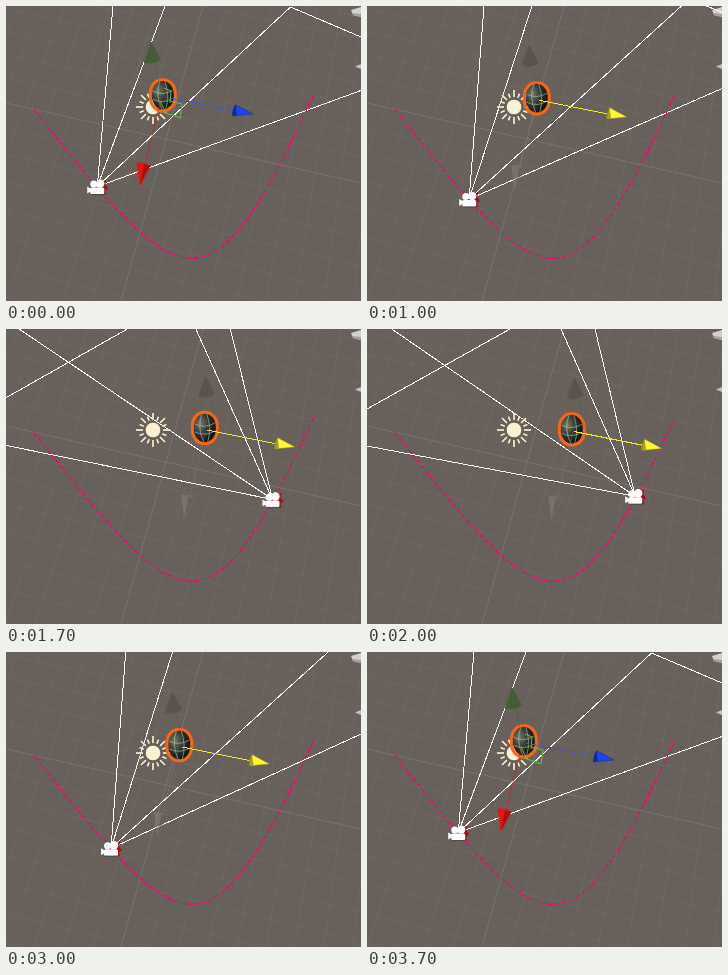
These frames come from a looping animation (355x295 px, 4.2 s). An HTML page:

```html
<!DOCTYPE html>
<html lang="en">
<head>
<meta charset="utf-8">
<title>Camera on a curve</title>
<style>
  html, body { margin: 0; width: 100%; height: 100%; overflow: hidden; background: #67605b; }
  svg { display: block; width: 100vw; height: 100vh; }
  .crisp { shape-rendering: crispEdges; }
</style>
</head>
<body>
<svg id="stage" viewBox="0 0 355 295" fill="none">
  <defs>
    <radialGradient id="ball" cx=".3" cy=".35" r=".8">
      <stop offset="0" stop-color="#77796a"/>
      <stop offset=".5" stop-color="#2b332d"/>
      <stop offset="1" stop-color="#080c0a"/>
    </radialGradient>
  </defs>
  <rect width="355" height="295" fill="#67605b"/>
  <g id="grid"></g>
  <path d="M345 4L355 1V11L347 9Z" fill="#d2d1cf"/>
  <path d="M346 7L355 8V11L347 9Z" fill="#a3a09d"/>
  <path d="M349 60.500L355 58V63Z" fill="#c4c2c0"/>
  <path id="frustum" class="crisp" stroke="#fff" stroke-width="1"/>
  <path class="crisp" d="M28 103.500C178 293 203 316 308.500 87" stroke="#fa0070" stroke-width="1.200" stroke-dasharray="5 2"/>
  <g id="sun" transform="translate(147 101)"></g>
  <g id="camera">
    <path d="M4 -5L9 -8L8 -3L11 1L8 3L9 7L5 6Z" fill="#a30f1c"/>
    <path d="M-10 -1L-5 2V3L-10 6Z" fill="#fff"/>
    <rect x="-7" y="0" width="14" height="6.500" rx="1.500" fill="#fff"/>
    <circle cx="-3.500" cy="-3.500" r="3.500" fill="#fff"/>
    <circle cx="3" cy="-4" r="4.200" fill="#fff"/>
    <path d="M-6 7H7" stroke="#464240" stroke-width=".8"/>
  </g>
  <g id="object">
    <ellipse rx="11" ry="14.500" fill="url(#ball)"/>
    <path d="M-10 -4Q0 1 10 -5M-10 4Q0 9 10 3M-3 -14Q-8 0 -1 14M2 -14Q7 0 3 14" stroke="#c3d3b6" stroke-width=".8" opacity=".7"/>
    <rect x="-12.500" y="-15.700" width="25" height="31.400" rx="12" ry="13.500" stroke="#ff6410" stroke-width="2.900"/>
  </g>
  <g id="up">
    <path d="M149 57L155 86" stroke-width="1" opacity=".4"/>
    <path d="M145 36L154 53Q148 59 138 56Z"/>
  </g>
  <g id="down">
    <path d="M155 93L139 159" stroke-width="1" opacity=".6"/>
    <path d="M134 179L131 157Q138 156 144 160Z"/>
    <path d="M134 179L138 158L144 160Z" fill="#000" stroke="none" opacity=".25"/>
  </g>
  <path id="planes" d="M154 95L160 107L174 112L176 98L164 95M158 82L165 85L164 97" stroke="#62c935" stroke-width="1"/>
  <g id="arrow">
    <path id="shaft" class="crisp" d="M159 91L229 105" stroke-width="1"/>
    <path id="tip" d="M247 108L229.500 98.500Q226 104 226.500 110Z" stroke-width=".5"/>
    <path d="M229.500 98.500Q226 104 226.500 110L231 109Z" fill="#000" opacity=".35"/>
  </g>
</svg>
<script>
const $ = id => document.getElementById(id);
const LOOP = 4200, STEP = 100;

// Drag distance per step, out and back
const out = [3, 6, 9, 13, 20, 24, 28, 32, 35.5, 39, 42, 45, 47, 48];
const back = [45, 39.5, 34, 31, 27, 24, 16.5, 11, 7, 3.3, 1.5, 0];

function drag(ms) {
  const n = Math.floor(ms / STEP);
  if (n < 7) return 0;
  if (n < 24) return out[Math.min(n - 7, out.length - 1)];
  return back[Math.min(n - 24, back.length - 1)];
}

function bezier(t) {
  const u = 1 - t;
  const mix = (a, b, c, d) => u * u * u * a + 3 * u * u * t * b + 3 * u * t * t * c + t * t * t * d;
  return [mix(28, 178, 203, 308), mix(104, 293, 316, 87)];
}

const move = (id, x, y) => $(id).setAttribute('transform', `translate(${x} ${y})`);
const paint = (id, attrs) => {
  for (const key in attrs) $(id).setAttribute(key, attrs[key]);
};

function drawGrid() {
  const line = (x1, y1, x2, y2, major) =>
    `<path d="M${x1} ${y1}L${x2} ${y2}" stroke="${major ? '#7f7b78' : '#77726e'}" stroke-width="${major ? 1 : .7}" opacity="${major ? .7 : .6}"/>`;
  let html = '';
  for (let i = -9; i <= 11; i++) html += line(197 + i * 23, 0, 115 + i * 29, 295, i === 0);
  for (let i = -7; i <= 8; i++) {
    const y = 97 + i * 25 + i * i * .4;
    html += line(0, y, 355, y + 80 + i * 1.5, i === 0);
  }
  $('grid').innerHTML = html;
}

function drawSun() {
  let rays = '';
  for (let i = 0; i < 16; i++) {
    const far = i % 2 ? 14.5 : 17;
    rays += `<path d="M0 -10V${-far}" transform="rotate(${i * 22.5})"/>`;
  }
  $('sun').innerHTML =
    `<g stroke="#4d4743" stroke-width="2.600" opacity=".4">${rays}</g>` +
    `<g stroke="#fbf0d2" stroke-width="1.700">${rays}</g>` +
    '<circle r="7.800" fill="#fbf0d2" stroke="#514b46" stroke-width=".7"/>';
}

function frustum(d, [x, y]) {
  const rays = ends => ends.map(([a, b]) => `M${x} ${y}L${a} ${b}`).join('');
  if (d < 18) {
    const corner = [284.5 + 2.9 * d, 1 - .62 * d];
    return rays([[107 + .77 * d, 0], [159 + .46 * d, 0], corner, [355, 84.5 - .15 * d]]) +
      `M${corner}L355 ${31 - 1.9 * d}`;
  }
  const e = (d - 32) / 16;
  return rays([[183 + 11 * e, 0], [218 + 10 * e, 0], [0, 5 - 22 * e], [0, 115.5 + 1.5 * e]]) +
    `M0 ${50 + 30 * e}L${85 + 58 * e} 0`;
}

function render(ms) {
  const d = drag(ms);
  const hover = ms >= 300 && ms < 3700;
  const held = ms >= 700 && ms < 3700;

  const eye = bezier(d < 18 ? .16 + .0025 * d : .843 + .0011 * (d - 32));
  $('frustum').setAttribute('d', frustum(d, [eye[0], eye[1] - 1]));
  move('camera', eye[0], eye[1]);
  move('object', 156.8 + d, 89.3 + .23 * d);

  move('up', 1.3 * d, .27 * d);
  move('down', 1.06 * d, .22 * d);
  move('arrow', d, .24 * d);

  const axis = (color, gray, alpha) => held
    ? { fill: gray, stroke: gray, opacity: alpha }
    : { fill: color, stroke: color, opacity: 1 };
  paint('up', axis('#465c37', '#4c4845', .5));
  paint('down', axis('#e3170f', '#85807b', .55));
  $('planes').setAttribute('visibility', held ? 'hidden' : 'visible');
  paint('shaft', { stroke: hover ? '#f5e929' : '#3450f0', 'stroke-dasharray': hover ? 'none' : '4 3' });
  paint('tip', { fill: hover ? '#fff534' : '#1f43ee', stroke: hover ? '#8c8420' : '#142d9c' });
}

drawGrid();
drawSun();
render(0);
const start = performance.now();
(function tick() {
  render((performance.now() - start) % LOOP);
  requestAnimationFrame(tick);
})();
</script>
</body>
</html>
```
